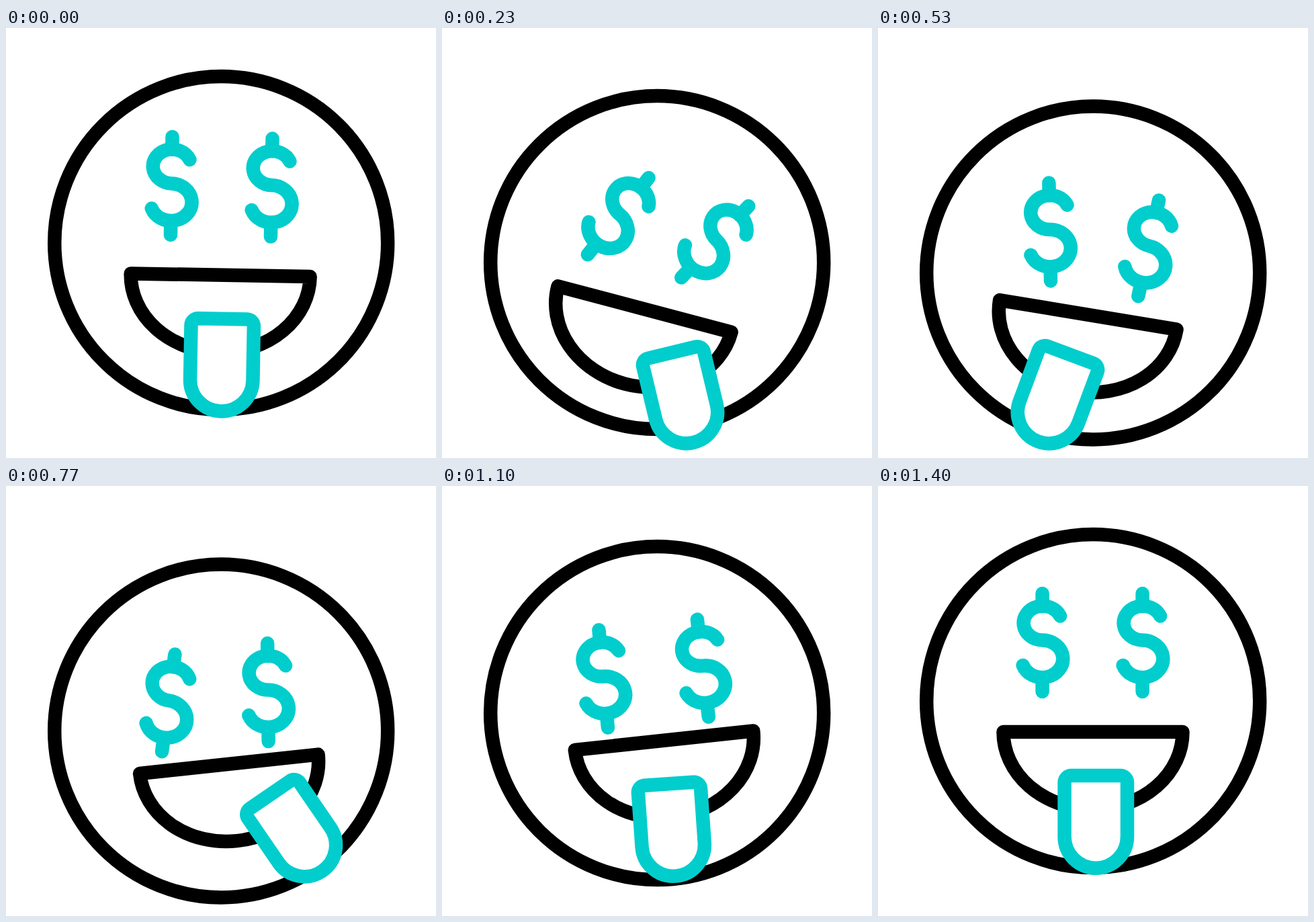
These frames come from a looping animation (640 px wide and 640 px high, 1.67 s). An HTML page:

```html
<!DOCTYPE html>
<html lang="en">
<head>
<meta charset="utf-8">
<title>Money face</title>
<style>
  html, body { margin: 0; width: 100%; height: 100%; overflow: hidden; background: #fff; }
  svg { display: block; width: 100vw; height: 100vh; fill: none; stroke-width: 20.5; stroke-linecap: round; stroke-linejoin: round; }
</style>
</head>
<body>
<svg viewBox="0 0 640 640">
  <defs>
    <path id="dollar" stroke="#02cdcd" d="M0-73V-54M0 52V73M26.5-39.5A28.5 25.5 0 1 0 0-3.5A30.8 27.75 0 1 1-28.9 34"/>
  </defs>
  <g id="head">
    <circle r="248" stroke="#000"/>
    <g id="face">
      <use id="left" href="#dollar"/>
      <use id="right" href="#dollar"/>
      <g id="jaw">
        <path stroke="#000" d="M-133.5 46H133.5A133.5 115 0 0 1-133.5 46Z"/>
        <!-- drawn around the point it swings from -->
        <path id="tongue" fill="#fff" stroke="#02cdcd" d="M-36.5 108.5H36.5a10.2 10.2 0 0 1 10.2 10.2V199.5a46.7 46.7 0 0 1-93.4 0V118.7a10.2 10.2 0 0 1 10.2-10.2Z"/>
      </g>
    </g>
  </g>
</svg>
<script>
const LOOP = 1670, STEP = 100 / 3;

// Eased 0 to 1 between steps a and b.
function ramp(t, a, b) {
  const u = Math.min(1, Math.max(0, (t - a) / (b - a)));
  return u * u * (3 - 2 * u);
}

// Rises over a..b, holds, falls over c..d.
const bump = (t, a, b, c, d) => ramp(t, a, b) - ramp(t, c, d);

const wave = (t, peak, period) => Math.cos(2 * Math.PI * (t - peak) / period);

function place(id, x, y, angle = 0) {
  document.getElementById(id).setAttribute('transform', `translate(${x} ${y}) rotate(${angle})`);
}

function draw(ms) {
  const t = Math.floor((ms % LOOP + 4) / STEP);

  place('head', 320.2, 320 + 44.5 * bump(t, 0, 11.6, 24, 40));

  // Lean right, then left, with a short wobble on the way back.
  const tilt = 15.5 * bump(t, -1.5, 8.2, 12.5, 22.5)
             - 6.1 * bump(t, 12.5, 22.5, 33, 42)
             + 5.1 * bump(t, 23, 29, 29, 33);
  place('face', 0, 0, tilt);

  const drop = bump(t, -1.9, 8.5, 28.5, 42);
  const eyeX = 2 * drop, eyeY = 37.3 * drop - 87;
  const leftTurn = bump(t, 0, 6, 28, 36) * Math.exp((7 - t) / 35)
                 * (3.5 + 20.4 * wave(t, 7.4, 14.5));
  const rightTurn = 28.4 * bump(t, 0, 7, 7, 18)
                  + 5.5 * bump(t, 15, 23, 23, 28)
                  - 5.3 * bump(t, 24, 29, 29, 34);
  place('left', eyeX - 75.6, eyeY, leftTurn);
  place('right', eyeX + 73.4, eyeY, rightTurn);

  const jawX = 7.3 * bump(t, 7, 27, 30, 42);
  const jawY = 27.2 * bump(t, -1.5, 8.2, 6, 32) - 4.5 * bump(t, 6, 32, 33, 42);
  place('jaw', jawX - 0.2, jawY);
  place('tongue', 4.3, 2.5, -bump(t, 0, 6, 24, 38) * (8.2 + 20.2 * wave(t, 7.2, 16)));
}

const start = performance.now();
function tick() {
  draw(performance.now() - start);
  requestAnimationFrame(tick);
}
tick();
</script>
</body>
</html>
```
